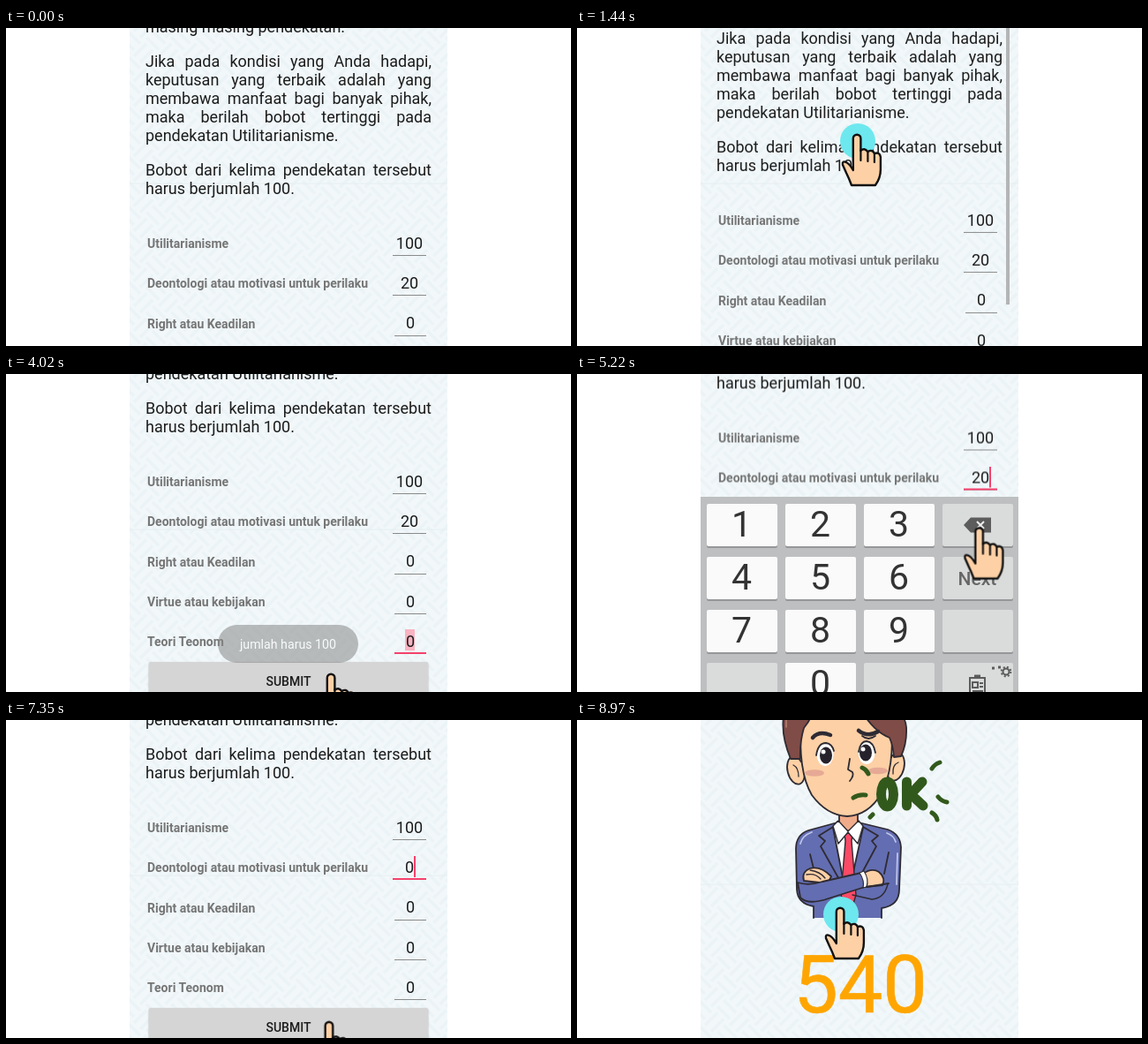
Write an HTML page that moves like this. It is 640 px wide and 360 px high and loops after 9 s.

```html
<!DOCTYPE html>
<html lang="id">
<head>
<meta charset="utf-8">
<title>Bobot pendekatan</title>
<style>
html, body { margin: 0; width: 100%; height: 100%; overflow: hidden; background: #fff; }
.stage { position: relative; width: 640px; height: 360px; overflow: hidden; font-family: Roboto, sans-serif; color: #1c1c1c; }
.stage * { box-sizing: border-box; }
.layer { position: absolute; left: 0; top: 0; width: 640px; height: 360px; overflow: hidden; }
svg { display: block; position: absolute; left: 0; top: 0; }
.scroll, .bar, .toast, .keys, .result, .sheet, .hand, .tap, .ok, .on, .off, .v20, .v2, .v0, .caret { animation: 9s linear infinite; }

.scroll { position: absolute; inset: 0; animation-name: scroll; }
.text { position: absolute; left: 158px; width: 324px; font-size: 18px; line-height: 21px; }
.text div { white-space: nowrap; text-align-last: justify; }
.text div:last-child { text-align-last: left; }

.row { position: absolute; left: 160px; width: 316px; height: 45px; }
.row b { position: absolute; top: 14.5px; font-size: 14px; line-height: 16px; color: #757575; white-space: nowrap; }
.field { position: absolute; right: 0; top: 0; width: 38px; height: 36.5px; border-bottom: 1px solid #8a8a8a; }
.field.narrow { width: 36px; }
.field span { position: absolute; left: 0; right: 0; top: 11.4px; text-align: center; font-size: 18px; line-height: 21px; }
.focus { position: absolute; left: 0; right: 0; top: 34.7px; height: 2px; background: #f5416c; }
.mark { position: absolute; left: 12px; top: 8.7px; width: 11px; height: 24px; background: #f9b3c1; }
.caret { position: absolute; left: 24px; top: 9px; width: 2px; height: 24px; background: #f5416c; animation-name: caret; animation-timing-function: step-end; }
.submit { position: absolute; left: 162px; top: 448px; width: 316px; height: 44px; background: #d5d5d6; border-radius: 2px;
  box-shadow: 0 1px 2px #999; font: 500 14px/45px Roboto, sans-serif; text-align: center; }
.bar { position: absolute; left: 486px; top: -65px; width: 4px; height: 378px; background: #b4b5b6; animation-name: bar; }

.toast { position: absolute; left: 240px; top: 284px; width: 159px; height: 43px; border-radius: 22px; background: #888;
  color: #fff; font-size: 14.2px; line-height: 45px; text-align: center; animation-name: toast; }

.keys { position: absolute; left: 140px; top: 139px; width: 360px; height: 250px; padding: 8px 6.5px; background: #bebfc0;
  display: grid; grid-template-columns: repeat(4, 80px); grid-auto-rows: 48px; gap: 12px 9px; animation-name: keys; }
.keys div { background: #fafafa; border-radius: 2px; box-shadow: 0 2px 0 #969798; font-size: 41px; line-height: 46px; text-align: center; color: #333; }
.keys .dim { background: #dadbdb; font-size: 21px; line-height: 50px; font-weight: 500; color: #666; position: relative; }

.result { animation-name: result; }
.sheet { position: absolute; left: 0; top: 0; width: 640px; height: 430px; animation-name: sheet; }
.hand { animation-name: hand; animation-timing-function: ease-in-out; }
.tap { animation-name: tap; }
.ok { animation-name: ok; transform-box: fill-box; transform-origin: center; }
.on { animation-name: on; }
.off { animation-name: off; }
.v20 { animation-name: v20; }
.v2 { animation-name: v2; }
.v0 { animation-name: v0; }

@keyframes scroll {
  0%, 9.5% { transform: translateY(0); }
  16% { transform: translateY(-26px); }
  26.67% { transform: translateY(-100.7px); }
  31%, 52.3% { transform: translateY(-122px); }
  55.5%, 76% { transform: translateY(-171.5px); }
  79%, 100% { transform: translateY(-122px); }
}
@keyframes bar {
  0%, 9% { transform: translateY(-18px); opacity: 0; }
  9.5% { transform: translateY(-18px); opacity: 1; }
  16% { transform: translateY(0); }
  26.67% { transform: translateY(52px); }
  31%, 37% { transform: translateY(65px); opacity: 1; }
  40%, 100% { transform: translateY(65px); opacity: 0; }
}
@keyframes toast {
  0%, 43% { opacity: 0; }
  44.67% { opacity: .55; }
  46%, 55% { opacity: .95; }
  58%, 100% { opacity: 0; }
}
@keyframes keys {
  0%, 52.3% { transform: translateY(225px); }
  55.5%, 76% { transform: translateY(0); }
  79%, 100% { transform: translateY(225px); }
}
@keyframes result { 0%, 85.9% { opacity: 0; } 86%, 100% { opacity: 1; } }
@keyframes sheet { 0%, 93.7% { transform: translateY(0); } 99.6%, 100% { transform: translateY(-54px); } }
@keyframes hand {
  0% { transform: translate(317px, 390px); }
  9.5% { transform: translate(317px, 148px); animation-timing-function: linear; }
  16% { transform: translate(317px, 120px); animation-timing-function: linear; }
  26.67% { transform: translate(317px, 80px); animation-timing-function: linear; }
  31%, 32.5% { transform: translate(317px, 66px); }
  40.5%, 45% { transform: translate(368px, 339px); }
  50.5%, 53% { transform: translate(457px, 172px); }
  60.5%, 67% { transform: translate(455px, 174px); }
  71.5%, 76% { transform: translate(298px, 346px); }
  82.5%, 86% { transform: translate(368px, 341px); }
  91%, 92.8% { transform: translate(298px, 308px); }
  99.6%, 100% { transform: translate(298px, 212px); }
}
@keyframes tap {
  0%, 9% { opacity: 0; }
  9.5%, 30.5% { opacity: 1; }
  31.2%, 40.8% { opacity: 0; }
  41.3%, 43% { opacity: 1; }
  43.6%, 50.4% { opacity: 0; }
  50.8%, 52% { opacity: 1; }
  52.5%, 61.5% { opacity: 0; }
  62%, 63% { opacity: 1; }
  63.5%, 65% { opacity: 0; }
  65.5%, 66.3% { opacity: 1; }
  66.8%, 72% { opacity: 0; }
  72.5%, 74% { opacity: 1; }
  75%, 83% { opacity: 0; }
  83.5%, 85.3% { opacity: 1; }
  85.9%, 92.8% { opacity: 0; }
  93.4%, 100% { opacity: 1; }
}
@keyframes ok {
  0%, 95.5% { opacity: 0; transform: scale(.6); }
  96% { opacity: 1; transform: scale(.7); }
  98%, 100% { opacity: 1; transform: scale(1); }
}
@keyframes on { 0%, 52.2% { opacity: 0; } 52.3%, 100% { opacity: 1; } }
@keyframes off { 0%, 52.2% { opacity: 1; } 52.3%, 100% { opacity: 0; } }
@keyframes v20 { 0%, 62.5% { opacity: 1; } 62.6%, 100% { opacity: 0; } }
@keyframes v2 { 0%, 62.5% { opacity: 0; } 62.6%, 65.9% { opacity: 1; } 66%, 100% { opacity: 0; } }
@keyframes v0 { 0%, 72.9% { opacity: 0; } 73%, 100% { opacity: 1; } }
@keyframes caret {
  0% { transform: translateX(5px); }
  62.6% { transform: none; }
  66% { transform: translateX(-5px); }
  73%, 100% { transform: none; }
}
</style>
</head>
<body>
<div class="stage">
  <svg width="640" height="360">
    <defs>
      <pattern id="weave" width="40" height="40" patternUnits="userSpaceOnUse" patternTransform="rotate(45)">
        <rect width="40" height="40" fill="#f2f8fa"/>
        <path d="M0 5H20M0 15H20M20 25H40M20 35H40M25 0V20M35 0V20M5 20V40M15 20V40" stroke="#ebf3f6" stroke-width="3.5"/>
      </pattern>
    </defs>
    <rect x="140" width="360" height="360" fill="url(#weave)"/>
    <path d="M140 176H500" stroke="#e6eef1"/>
  </svg>

  <div class="layer">
    <div class="scroll">
      <div class="text" style="top:-12.3px"><div>masing masing pendekatan.</div></div>
      <div class="text" style="top:26.7px">
        <div>Jika pada kondisi yang Anda hadapi,</div>
        <div>keputusan yang terbaik adalah yang</div>
        <div>membawa manfaat bagi banyak pihak,</div>
        <div>maka berilah bobot tertinggi pada</div>
        <div>pendekatan Utilitarianisme.</div>
      </div>
      <div class="text" style="top:149.7px">
        <div>Bobot dari kelima pendekatan tersebut</div>
        <div>harus berjumlah 100.</div>
      </div>
      <div class="row" style="top:221.3px"><b>Utilitarianisme</b><div class="field"><span>100</span></div></div>
      <div class="row" style="top:266.6px"><b>Deontologi atau motivasi untuk perilaku</b>
        <div class="field">
          <span class="v20">20</span><span class="v2">2</span><span class="v0">0</span>
          <div class="on"><i class="focus"></i><i class="caret"></i></div>
        </div>
      </div>
      <div class="row" style="top:312px"><b>Right atau Keadilan</b><div class="field narrow"><span>0</span></div></div>
      <div class="row" style="top:357.3px"><b>Virtue atau kebijakan</b><div class="field narrow"><span>0</span></div></div>
      <div class="row" style="top:402.6px"><b>Teori Teonom</b>
        <div class="field narrow">
          <div class="off"><i class="focus"></i><i class="mark"></i></div>
          <span>0</span>
        </div>
      </div>
      <div class="submit">SUBMIT</div>
    </div>
    <div class="bar"></div>
    <div class="keys">
      <div>1</div><div>2</div><div>3</div>
      <div class="dim"><svg width="80" height="48">
        <path d="M24 24L32 15.5H55V32.5H32Z" fill="#5c5c5c"/>
        <path d="M39 20L47 28M47 20L39 28" stroke="#eee" stroke-width="2"/>
      </svg></div>
      <div>4</div><div>5</div><div>6</div><div class="dim">Next</div>
      <div>7</div><div>8</div><div>9</div><div class="dim"></div>
      <div class="dim"></div><div>0</div><div class="dim"></div>
      <div class="dim"><svg width="80" height="48" fill="none" stroke="#5c5c5c">
        <path d="M31 17H48V38H31ZM34 22H40V28H34ZM42 23H46M42 27H46M34 32H46" stroke-width="2"/>
        <path d="M36 15H43" stroke-width="3"/>
        <path d="M56 6h3M63 5h3" stroke-width="3"/>
        <circle cx="72" cy="10" r="3.5" stroke-width="2"/>
        <circle cx="72" cy="10" r="5.3" stroke-width="2" stroke-dasharray="2 2.2"/>
      </svg></div>
    </div>
    <div class="toast">jumlah harus 100</div>
  </div>

  <div class="layer result">
    <div class="sheet">
      <svg width="640" height="430" stroke-linejoin="round" stroke-linecap="round">
        <rect x="140" width="360" height="430" fill="url(#weave)"/>
        <path d="M140 240H500" stroke="#e6eef1"/>
        <g stroke="#2e2b33" stroke-width="1.8">
          <path d="M297 155V171L307 181L318 171V155Z" fill="#f0ac8a"/>
          <path d="M268 278V265Q250 262 249 246L248 200Q248 184 262 179L295 170L307 182L319 170L352 178Q366 183 367 198L365 246Q365 264 345 267V278" fill="#636db1"/>
          <path d="M253 194Q255 185 266 181M361 192Q359 185 351 182M363 205L362 240" fill="none" stroke="#bcc4ea"/>
          <path d="M295 169L290 176L306 258L324 176L319 169L307 181Z" fill="#fff"/>
          <path d="M303 183L307 179L312 183L311 191L316 252L313 262L306 275L301 262L299 250L304 191Z" fill="#fb4a66" stroke-width="1.4"/>
          <path d="M290 175L274 185L281 191L276 197L299 238M324 175L341 185L334 191L339 197L317 238M264 206L269 226M353 204L348 228" fill="none"/>
          <path d="M290 174L296 194L307 181L318 194L324 174L319 168L307 180L296 168Z" fill="#fff" stroke-width="1.4"/>
          <path d="M324 228Q334 221 342 226Q350 233 346 241L326 243Z" fill="#fdd0a5"/>
          <path d="M257 236Q254 226 264 222Q276 219 288 231L284 239Z" fill="#fdd0a5"/>
          <path d="M260 229Q270 227 276 234M264 224Q276 226 281 233" fill="none" stroke-width="1.3"/>
          <path d="M250 238Q262 242 278 237L322 227Q328 235 326 243L285 256Q262 264 253 255Z" fill="#636db1"/>
          <path d="M320 227L325 225Q331 234 328 243L324 244Q326 236 320 227Z" fill="#fff" stroke-width="1.2"/>
          <path d="M328 243L353 239" fill="none"/>
          <path d="M352 240Q348 256 334 257L312 252" fill="none" stroke-width="1.4"/>
          <ellipse cx="248" cy="111" rx="9.500" ry="16" fill="#fdd0a5" transform="rotate(-14 248 111)"/>
          <ellipse cx="361" cy="107" rx="9.500" ry="16" fill="#fdd0a5" transform="rotate(14 361 107)"/>
          <path d="M245 105Q251 108 251 118M364 102Q357 105 358 115" fill="none" stroke-width="1.3"/>
          <path d="M254 55Q250 112 266 139Q283 162 306 163Q330 162 345 137Q360 108 356 55Q308 10 254 55Z" fill="#fdd0a5"/>
          <path d="M242 98Q231 72 234 50Q240 20 262 10Q286 -3 313 4Q332 8 342 15Q354 16 364 13Q362 27 346 29Q371 42 373 62Q374 80 367 95L359 96Q358 83 354 74Q336 67 322 43L327 52Q309 47 291 32Q292 45 299 51Q281 47 271 34Q267 51 257 63Q252 80 253 98Z" fill="#804c47"/>
          <path d="M237 62Q236 48 243 35Q252 18 267 12Q286 4 308 7" fill="none" stroke="#b98474" stroke-width="1.500"/>
          <path d="M342 16Q354 17 364 13Q361 26 346 28Z" fill="#d08f78" stroke-width="1.3"/>
          <path d="M267 74Q274 66 287 71M319 66Q329 74 341 67" fill="none" stroke-width="4.500"/>
          <path d="M323 72Q330 78 338 72" fill="none"/>
        </g>
        <g fill="#e6a995"><ellipse cx="269" cy="114" rx="11" ry="3.800"/><ellipse cx="341" cy="111.500" rx="11" ry="3.800"/></g>
        <g fill="#fff"><ellipse cx="281" cy="93" rx="9.500" ry="13"/><ellipse cx="328" cy="91" rx="9.500" ry="13"/></g>
        <g fill="#25222b"><ellipse cx="282" cy="94" rx="7" ry="9.500"/><ellipse cx="327" cy="91" rx="7" ry="9.500"/></g>
        <g fill="#fff"><circle cx="279" cy="90" r="2.500"/><circle cx="324" cy="87" r="2.500"/></g>
        <path d="M271 94Q273 80 282 80Q289 81 291 89M319 90Q321 78 328 78Q336 79 338 91M309 98L307 110L312 113Q314 117 309 123" fill="none" stroke="#2e2b33" stroke-width="1.800"/>
        <text x="321" y="385" text-anchor="middle" font-family="Roboto, sans-serif" font-size="90" fill="#ffa500" stroke="#ffa500" stroke-width=".6">540</text>
      </svg>
    </div>
    <svg width="640" height="360">
      <g class="ok" fill="none" stroke="#32591c" stroke-width="5" stroke-linecap="round" stroke-linejoin="round">
        <ellipse cx="351.500" cy="84" rx="7" ry="14" stroke-width="11"/>
        <path d="M373.500 70V97M391 70L378 84L392 97" stroke-width="11"/>
        <path d="M402 55Q405 50 411 48M409 87Q413 92 419 93M402 105Q407 108 408 113M323 54Q328 56 330 61M313 88Q319 84 327 85M332 110L335 107"/>
      </g>
    </svg>
  </div>

  <svg width="640" height="360">
    <g class="hand">
      <circle class="tap" cx="1" cy="8" r="20" fill="#6de8ee"/>
      <path d="M-4.200 5a4.300 4.300 0 0 1 8.600 0V19q4-4 8 1q5-3 7.500 2q6-2 7 4V40q0 10-6 18H-6Q-9 50-12 44L-16 35q-1-5 4-3q4 2 7.800 9Z" fill="#fdd0a5" stroke="#111" stroke-width="2.400" stroke-linejoin="round"/>
      <path d="M4.400 18V30M12.400 20V31M19.900 22V32" stroke="#111" stroke-width="2.200" stroke-linecap="round"/>
    </g>
  </svg>
</div>
</body>
</html>
```
